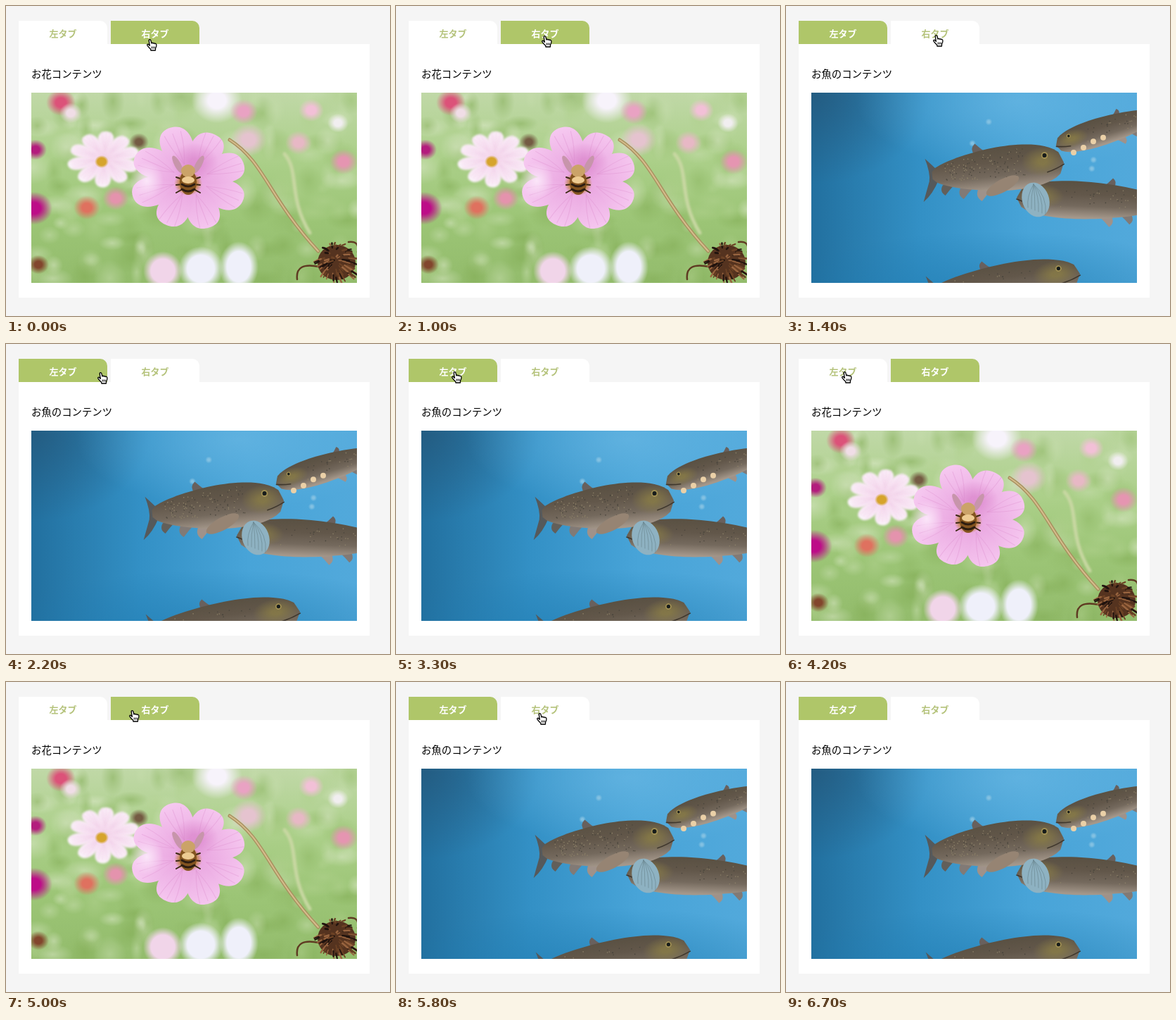
An HTML page with a canvas that plays this animation: 546 by 440 pixels, repeating every 6800 ms.

```html
<!DOCTYPE html>
<html lang="ja">
<head>
<meta charset="utf-8">
<title>タブ</title>
<style>
  html, body { margin: 0; width: 100%; height: 100%; overflow: hidden; background: #f5f5f5; }
  body { position: relative; font-family: "Noto Sans CJK JP", "Noto Sans CJK", sans-serif; }
  .tab, .panel, .text, canvas, svg { position: absolute; }
  .tab {
    top: 21px; width: 126px; height: 33px; border-radius: 0 10px 0 0;
    font-size: 13px; font-weight: 700; line-height: 36px; text-align: center;
    background: #afc669; color: #fff;
  }
  .tab.on { background: #fff; color: #b5c37c; }
  #left { left: 18px; }
  #right { left: 149px; }
  .panel { left: 18px; top: 54px; width: 499px; height: 360px; background: #fff; }
  .text { left: 36px; top: 85px; font-size: 14.4px; line-height: 21px; color: #000; white-space: nowrap; }
  canvas { left: 36px; top: 123px; }
  svg { left: 0; top: 0; }
</style>
</head>
<body>
<div class="tab" id="left">左タブ</div>
<div class="tab" id="right">右タブ</div>
<div class="panel"></div>
<div class="text" id="caption"></div>
<canvas id="flower" width="463" height="270"></canvas>
<canvas id="fish" width="463" height="270"></canvas>
<svg id="hand" width="16" height="18" viewBox="0 0 16 18">
  <path d="M3.2 2.2C3 .4 5.4 .2 5.8 1.8L7 6C7.3 4.8 9 5 9.2 6.2C9.6 5.2 11.2 5.4 11.4 6.6C12 5.8 13.6 6.2 13.8 7.6C14.2 9.6 13.6 11.4 12.6 13L12.4 16H6L5.6 14.2C3.6 12.4 2 10.4 .9 8.8C.2 7.4 2 6.6 3.2 8L4.4 9.3Z"
    fill="#fff" stroke="#000" stroke-width="1.3" stroke-linejoin="round"/>
  <path d="M7.2 10.5V13.5M9.2 10.5V13.5M11.2 10.5V13.5" stroke="#000"/>
</svg>
<script>
const $ = id => document.getElementById(id);
const LOOP = 6800, STEP = 100;
const { sin, cos, PI } = Math;
let ctx;

function begin(id, ...colors) {
  ctx = $(id).getContext('2d');
  ctx.translate(-36, -123); // draw in stage coordinates
  ctx.lineCap = 'round';
  ctx.fillStyle = id === 'fish' ? fade(36, 0, 499, 0, colors) : fade(0, 123, 0, 393, colors);
  ctx.fillRect(36, 123, 463, 270);
}

function random(seed) {
  return () => (seed = (seed * 16807) % 2147483647) / 2147483647;
}

function fade(x0, y0, x1, y1, colors) {
  const g = ctx.createLinearGradient(x0, y0, x1, y1);
  colors.forEach((c, i) => g.addColorStop(i / (colors.length - 1), c));
  return g;
}

function local(x, y, angle, sx, sy, draw) {
  ctx.save();
  ctx.translate(x, y);
  ctx.scale(sx, sy);
  ctx.rotate(angle);
  draw();
  ctx.restore();
}

// Soft ellipse; core is the solid share of the radius.
function blob(x, y, rx, ry, color, core = 0.3) {
  local(x, y, 0, rx, ry, () => {
    const g = ctx.createRadialGradient(0, 0, core, 0, 0, 1);
    g.addColorStop(0, color);
    g.addColorStop(1, color.slice(0, 7) + '00');
    ctx.fillStyle = g;
    ctx.fillRect(-1, -1, 2, 2);
  });
}

function oval(x, y, rx, ry, color, angle = 0) {
  ctx.beginPath();
  ctx.ellipse(x, y, rx, ry, angle, 0, 7);
  ctx.fillStyle = color;
  ctx.fill();
}

function fill(d, color) {
  ctx.fillStyle = color;
  ctx.fill(new Path2D(d));
}

function stroke(d, color, width) {
  ctx.strokeStyle = color;
  ctx.lineWidth = width;
  ctx.stroke(new Path2D(d));
}

// Ring of n petals of length r.
function flower(n, r, inner, outer, vein) {
  const w = r * 2.3 / n;
  for (let i = 0; i < n; i++) {
    local(0, 0, i * 3 * 2 * PI / n + 0.45, 1, 1, () => {
      const tip = r * (0.97 + 0.05 * sin(i * 2));
      fill(`M0 0C${r * 0.3} ${-w} ${tip} ${-w * 1.5} ${tip} 0C${tip} ${w * 1.5} ${r * 0.3} ${w} 0 0`,
        fade(0, 0, r, 0, [inner, outer]));
      for (let v = -1; v <= 1; v++) stroke(`M${r * 0.3} 0Q${r * 0.6} ${v * w * 0.4} ${r * 0.9} ${v * w * 0.5}`, vein, 1);
    });
  }
}

function bee(x, y) {
  blob(x, y + 6, 20, 17, '#b87d22', 0.5);
  for (const side of [-1, 1]) {
    oval(x + 15 * side, y - 21, 4.5, 14, '#c795ab', 0.5 * side);
    for (let i = 0; i < 3; i++) stroke(`M${x + 8 * side} ${y + i * 7}l${9 * side} ${i * 4 - 3}`, '#3b2812', 2);
  }
  oval(x, y + 4, 12, 18, '#83541f');
  oval(x, y - 12, 10, 9, '#cba368');
  oval(x, y + 1, 9, 5, '#edcb91');
  for (let i = 0; i < 2; i++) stroke(`M${x - 9} ${y + 7 + i * 7}q9 6 18 0`, '#2d1d11', 3);
}

function seedHead(x, y, rnd) {
  stroke(`M${x - 25} ${y + 9}q-34 -7 -31 18M${x + 17} ${y - 26}q16 -2 13 14`, '#5f3b22', 2.5);
  oval(x, y + 3, 27, 25, '#55331f');
  for (let i = 0; i < 80; i++) {
    const a = rnd() * 2 * PI, r = 26 * Math.sqrt(rnd());
    const dx = cos(a), dy = sin(a);
    stroke(`M${x + r * dx} ${y + 2 + r * dy}l${dx * 8 + 2} ${dy * 5 + 3}`,
      ['#20130e', '#98643f', '#6c4225'][i % 3], 1.5 + rnd() * 1.5);
  }
}

function drawFlower() {
  begin('flower', '#c0d8a7', '#acd08a', '#9cc576', '#93bc6c');
  const rnd = random(41);
  const greens = ['#dbe8c888', '#83ad5688', '#c5dcab88', '#8fb86588', '#afd08c88'];
  for (let i = 0; i < 150; i++) {
    blob(36 + rnd() * 463, 123 + rnd() * 270, 8 + rnd() * 24, 8 + rnd() * 20, greens[i % 5], 0);
  }
  // distant blossoms
  const far = [
    [78, 137, 21, '#dc5279'], [92, 152, 16, '#f0dde6'], [300, 134, 36, '#f7f3fb'],
    [338, 150, 20, '#e9a2c3'], [345, 190, 26, '#e5c3cf'], [434, 148, 18, '#f2c0d7'],
    [472, 166, 15, '#f1eef0'], [416, 194, 19, '#e7b8c5'], [480, 221, 20, '#e595b1'],
    [42, 204, 16, '#b31d7d'], [40, 287, 26, '#bd0c88'], [115, 286, 19, '#df715f'],
    [156, 273, 19, '#e493ad'], [46, 367, 15, '#82462d'], [189, 193, 14, '#745b43']
  ];
  for (const [x, y, r, color] of far) blob(x, y, r, r * 0.9, color, 0.35);
  for (let i = 0; i < 3; i++) blob(223 + i * 54, 376 - i * 3, 28 + 4 * (i % 2), 28 + i * 4, i ? '#eff0fa' : '#f1d5e9', 0.6);

  ctx.filter = 'blur(1.5px)';
  stroke('M396 210C418 235 400 270 432 322', '#c8d7a2', 5);
  local(140, 216, 0.55, 1.1, 0.85, () => flower(10, 48, '#f3d2ea', '#fcf3fb', '#f3d2ea'));
  ctx.filter = 'none';
  blob(136, 221, 10, 9, '#d6a42c', 0.6);

  const stem = 'M318 190C368 222 372 270 444 348';
  stroke(stem, '#a99160', 5);
  stroke(stem, '#d5bd8c', 2);
  local(262, 246, 0, 1.06, 0.95, () => flower(8, 80, '#e7a0dd', '#f6c8f0', '#dc8fce66'));
  blob(200, 248, 24, 26, '#fbe6f9', 0);
  blob(268, 222, 34, 28, '#d77fc799', 0.2);
  bee(259, 246);
  seedHead(470, 361, rnd);
}

// Side view, nose at the origin and tail along +x.
function fish(x, y, dir, angle, len, height, spots) {
  const half = u => 5 * u + height * Math.max(0, sin(PI * u ** 0.66)) ** 0.6;
  const fin = (u, side, size, color) => {
    const px = u * len, py = side * half(u) * 0.85;
    fill(`M${px - size * 0.6} ${py}Q${px} ${py + side * size * 0.5} ${px + size * 0.45} ${py + side * size}` +
      `Q${px + size} ${py + side * size * 0.6} ${px + size * 0.6} ${py}Z`, color);
  };
  local(x, y, angle, dir, 1, () => {
    fill(`M${len - 9} -6L${len + 8} -25Q${len + 2} -4 ${len + 5} 8L${len + 16} 36Q${len + 2} 27 ${len - 9} 6Z`, '#55595b');
    fin(0.62, -1, height * 0.5, '#68605d');
    for (let i = 0; i < 3; i++) fin(0.6 + i * 0.14, 1, height * (0.62 - i * 0.06), ['#9f928a', '#817a76', '#625f5a'][i]);
    let d = '', back = '';
    for (let i = 0; i <= 30; i++) {
      const u = i / 30;
      d += `${i ? 'L' : 'M'}${u * len} ${-half(u)}`;
      back = `L${u * len} ${half(u)}` + back;
    }
    fill(d + back + 'Z', fade(0, -height, 0, height, ['#5a5143', '#62574a', '#74695d', '#a5988b']));
    const rnd = random(7);
    for (let i = 0; i < spots; i++) {
      const u = 0.3 + rnd() * 0.6;
      oval(u * len, (rnd() * 1.3 - 0.8) * half(u), 0.8, 0.8, i % 2 ? '#49453c' : '#8c8068');
    }
    // head
    blob(len * 0.16, -height * 0.15, len * 0.16, height * 0.7, '#8c7f45bb', 0.2);
    stroke(`M0 ${height * 0.08}q${len * 0.06} ${height * 0.2} ${len * 0.13} ${height * 0.3}`, '#3f372d', 1.6);
    oval(len * 0.14, -height * 0.42, height * 0.16, height * 0.16, '#a59355');
    oval(len * 0.14, -height * 0.42, height * 0.1, height * 0.1, '#181d1b');
  });
}

function drawFish() {
  begin('fish', '#22709f', '#3390c5', '#48a4d8', '#52a9db');
  blob(36, 123, 170, 130, '#245577bb', 0);
  blob(330, 135, 230, 100, '#68b7e3bb', 0);
  blob(300, 415, 330, 95, '#1c78aeaa', 0);
  const rnd = random(19);
  for (let i = 0; i < 5; i++) blob(265 + rnd() * 190, 150 + rnd() * 90, 5, 5, '#83c1e2');

  fish(384, 198, 1, -0.3, 150, 18, 30);
  for (let i = 0; i < 4; i++) oval(409 + 14 * i, 208 - 7.5 * i + 3 * sin(i * 3), 4, 4, '#ead0a7');
  fish(328, 272, 1, 0.04, 210, 25, 40);
  fish(395, 222, -1, 0.1, 188, 30, 130);
  fish(418, 380, -1, 0.13, 210, 27, 30);

  // near pectoral fins
  oval(355, 275, 19, 25, '#8eb2c2', -0.35);
  for (let i = 0; i < 6; i++) stroke(`M352 253Q${342 + i * 6} 270 ${344 + i * 5} ${286 + i * 2}`, '#6b8791aa', 1);
  oval(308, 255, 26, 9, '#968473', -0.5);
}

// time, x, y of the pointer's box
const path = [[0, 200, 47], [1400, 209, 41], [2800, 79, 39], [4300, 79, 39],
  [4600, 122, 18], [5000, 175, 40], [5800, 200, 44], [6300, 236, 445]];

function pointer(t) {
  const i = path.findIndex(k => k[0] > t);
  if (i < 0) return path[path.length - 1].slice(1);
  const [t0, x0, y0] = path[i - 1], [t1, x1, y1] = path[i];
  const u = (t - t0) / (t1 - t0), e = u * u * (3 - 2 * u);
  return [x0 + (x1 - x0) * e, y0 + (y1 - y0) * e];
}

function show(now) {
  const t = Math.floor((now % LOOP) / STEP) * STEP;
  const fishOn = (t >= 1200 && t < 3400) || t >= 5800;
  $('left').classList.toggle('on', !fishOn);
  $('right').classList.toggle('on', fishOn);
  $('fish').style.visibility = fishOn ? 'visible' : 'hidden';
  $('flower').style.visibility = fishOn ? 'hidden' : 'visible';
  $('caption').textContent = fishOn ? 'お魚のコンテンツ' : 'お花コンテンツ';
  const [x, y] = pointer(t);
  $('hand').style.transform = `translate(${Math.round(x)}px, ${Math.round(y)}px)`;
}

drawFlower();
drawFish();
show(0);
const start = performance.now();
function tick() {
  show(performance.now() - start);
  requestAnimationFrame(tick);
}
requestAnimationFrame(tick);
</script>
</body>
</html>
```
